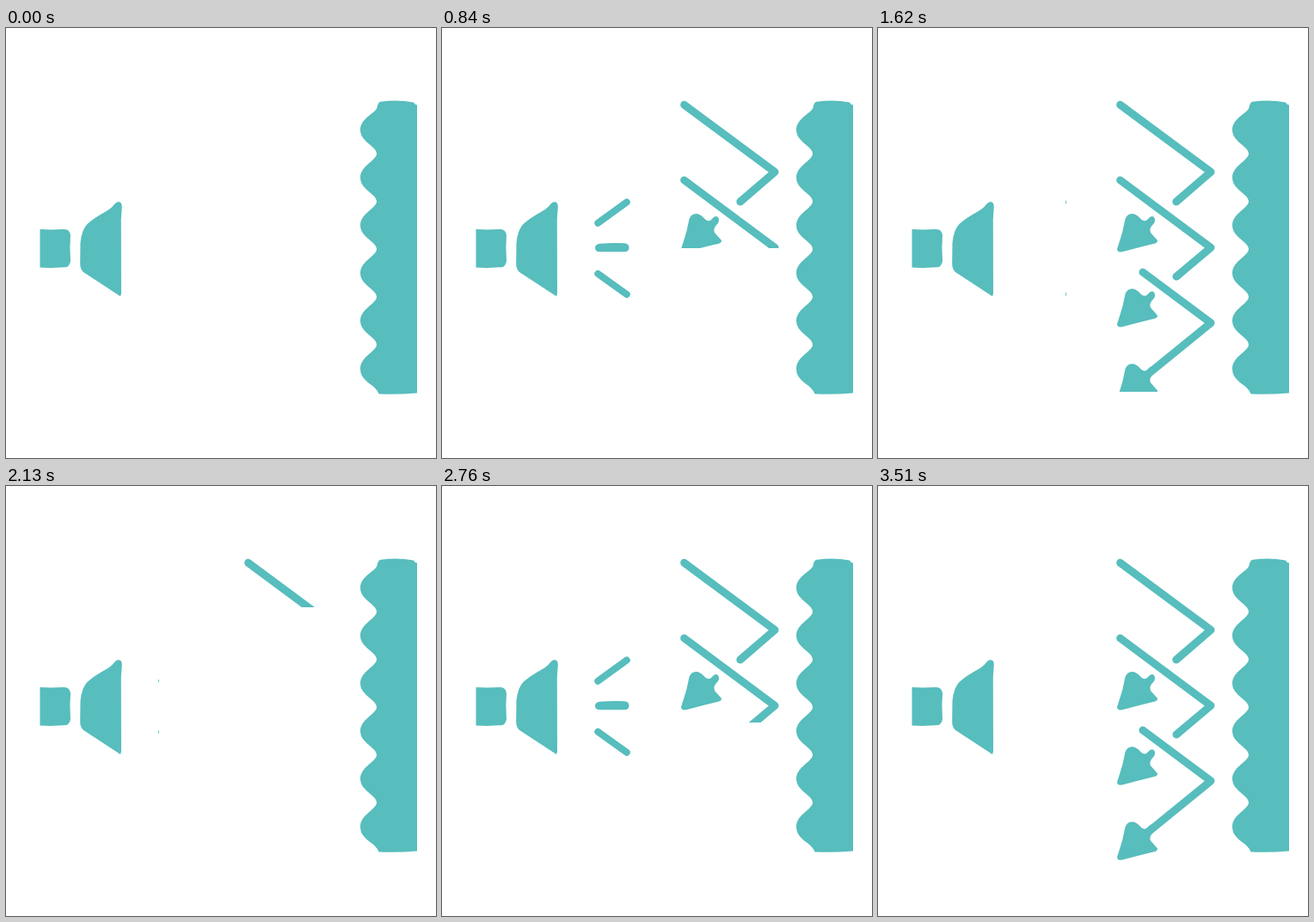
An HTML page that plays this animation: 500x500 px, repeating every 3.66 s.

```html
<!DOCTYPE html>
<html lang="en">
<head>
<meta charset="utf-8">
<title>Sound reflection</title>
<style>
  html, body { margin: 0; width: 100%; height: 100%; overflow: hidden; background: #fff; }
  svg { display: block; width: 100vw; height: 100vh; }
  .line { fill: none; stroke: #57bdbd; stroke-linecap: round; stroke-linejoin: round; }
</style>
</head>
<body>
<svg viewBox="0 0 500 500" fill="#57bdbd">
  <defs>
    <clipPath id="rayClip"><rect id="rayWindow" y="190" height="130"/></clipPath>
    <clipPath id="arrowClip"><rect id="arrowWindow" x="270" y="80" width="130"/></clipPath>
    <path id="head" d="M278 257L281.5 246L284.5 236L287.5 222Q290 215 297 216Q302 217.500 305.500 222
      Q310.500 226.500 314 222Q317 218 320 219.300Q323.500 222 321 227Q314.500 233 317 238L325 247
      Q325.500 250.500 318 251.500L302 255.500L285 260Q278 261.500 278 257Z"/>
  </defs>

  <path d="M39.500 234L52 234.600L67 234Q74 233.500 75 241L74.400 255L75 271Q74 279 66 278.300L52 279L39.500 278.500Z"/>
  <path d="M124 207.500Q128 201.500 132 202.300Q135.500 204 134.700 210L133.800 222L134 309L133 312L91 284.500
    Q86 281 86.200 274L86.500 250Q88 234 95 227.500Q103 220.500 115 214Q120 211.500 124 207.500Z"/>
  <path id="wall"/>

  <g clip-path="url(#rayClip)">
    <path class="line" stroke-width="8" d="M181.300 226.800L214.800 202.500M181.300 285.800L214.800 309.700"/>
    <path d="M178 255.800Q178 251.200 184 250.800Q198 249.500 212 250.300Q217.500 250.800 217.500 255.500
      Q217.500 260 212 260.300H184Q178 260.300 178 255.800Z"/>
  </g>

  <g clip-path="url(#arrowClip)">
    <path class="line" stroke-width="9" d="M281.700 89.300L387 167.400L346.800 202"/>
    <path class="line" stroke-width="9" d="M281.700 177L387 255.400L347 289"/>
    <path class="line" stroke-width="9" d="M308 284L387 342.900L312 404"/>
    <use href="#head"/>
    <use href="#head" y="87.300"/>
    <use href="#head" y="174.500"/>
  </g>
</svg>
<script>
  const CYCLE = 1830, STEP = 30;
  const byId = id => document.getElementById(id);
  const clamp = (v, lo, hi) => Math.min(hi, Math.max(lo, v));

  // Wavy left edge: one rounded crest after each trough.
  const pitch = 55.5, top0 = 90.5;
  let edge = "M431.500 92";
  for (let i = 0; i < 6; i++) {
    const y = top0 + i * pitch, last = i === 5;
    edge += `C431 ${y + 8} 412 ${y + 14} 412 ${y + 28}`;
    edge += last ? `C412 ${y + 44} 430 ${y + 46} 433.5 425.5`
                 : `C412 ${y + 42} 431 ${y + 47} 431 ${y + pitch}`;
  }
  byId("wall").setAttribute("d",
    edge + "Q456 426.5 478 424.500V89.500L476 89L474 86.500Q456 83 435.500 85.700Q432.800 86 431.500 92Z");

  function draw(now) {
    const t = Math.floor((now % CYCLE) / STEP + 0.001) * STEP;

    // Rays appear and later vanish from left to right.
    const left = clamp(Math.round(56 + t * 0.1), 170, 225);
    const right = clamp(Math.round(148 + t * 0.1), 170, 225);
    byId("rayWindow").setAttribute("x", left);
    byId("rayWindow").setAttribute("width", Math.max(0, right - left));

    // Arrows are uncovered from top to bottom.
    const bottom = t >= 1680 ? 440 : Math.round(76.64 + t * 0.21364);
    byId("arrowWindow").setAttribute("height", Math.max(0, bottom - 80));
  }

  function tick() {
    draw(performance.now());
    requestAnimationFrame(tick);
  }
  tick();
</script>
</body>
</html>
```
